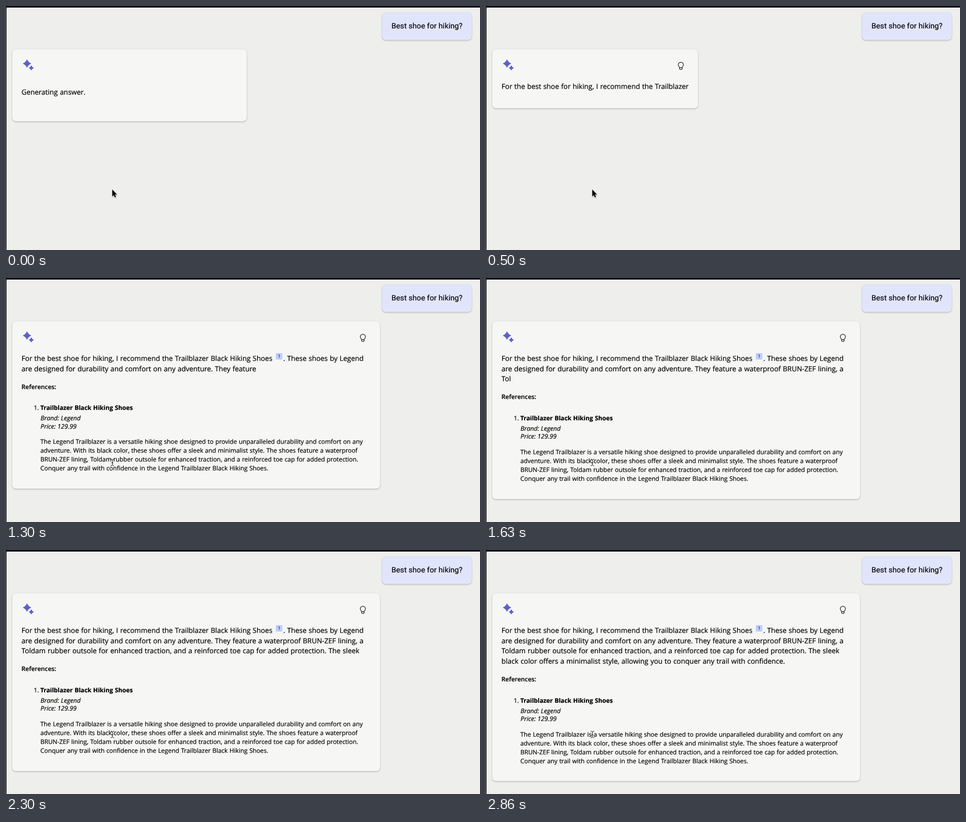
These frames come from a looping animation (910x468 px, 3530 ms). An HTML page:

```html
<!DOCTYPE html>
<html lang="en">
<head>
<meta charset="utf-8">
<title>Chat answer</title>
<style>
  html, body { margin: 0; width: 100%; height: 100%; overflow: hidden; background: #eeeeec; }
  #stage { position: absolute; left: 0; top: 0; width: 910px; height: 468px; overflow: hidden; }
  #stage::before { content: ""; position: absolute; inset: 0; border: solid #0a0309; border-width: 3px 0 0 1px; }
  .box { position: absolute; box-sizing: border-box; border-radius: 7px;
    box-shadow: 0 0 2px rgba(0,0,0,.14), 0 1.5px 3px rgba(0,0,0,.19); }
  #ask { left: 722px; top: 13px; width: 172px; height: 52px; background: #e1e5fc; }
  #card { left: 12px; top: 82.5px; background: #f6f6f5; }
  svg { position: absolute; left: 0; top: 0; }
  text { font-family: "Open Sans", "Noto Sans", sans-serif; fill: #000; stroke: #000; stroke-width: .2px;
    text-rendering: geometricPrecision; white-space: pre; }
  .main { font-size: 13.48px; word-spacing: .48px; }
  .small { font-size: 11.85px; word-spacing: .4px; }
  .semi { font-weight: 600; }
  .bold { font-weight: 700; }
  .ital { font-style: italic; font-size: 12.2px; }
  .ask { font-family: Roboto, Inter, sans-serif; font-size: 14.4px; letter-spacing: .13px; }
  .mark { font-size: 9px; font-weight: 600; fill: #2c3c9c; stroke: none; text-anchor: middle; }
</style>
</head>
<body>
<div id="stage">
  <div id="ask" class="box"></div>
  <div id="card" class="box"></div>
  <svg id="art" width="910" height="468" viewBox="0 0 910 468">
    <text class="ask" x="740" y="43.3">Best shoe for hiking?</text>
    <g id="stars" fill="#5a62cf" stroke="#5a62cf" stroke-width="1.2" stroke-linejoin="round"></g>
    <g id="bulb" fill="none" stroke="#151515" stroke-width="1.15" stroke-linejoin="round">
      <path d="M-2.5 118.3L-3 116.6C-4.6 115.4-5 114-5 112.9a5 5 0 0 1 10 0C5 114 4.6 115.4 3 116.6L2.5 118.3Z
        M-2.5 118.3v1.8q0 1.6 1.6 1.6h1.8q1.6 0 1.6-1.6v-1.8"/>
    </g>
    <text id="wait" class="main" x="29.7" y="169.7">Generating answer.</text>
    <g id="answer"></g>
    <g id="cite">
      <rect x="518" y="144" width="12.5" height="12.5" rx="2" fill="#bfcdfc"/>
      <text class="mark" x="524.2" y="153.4">1</text>
    </g>
    <g id="refs">
      <text class="small semi" x="29.8" y="192.8">References:</text>
      <text class="small" x="53.3" y="233.4">1.</text>
      <text class="small bold" x="66" y="233.4">Trailblazer Black Hiking Shoes</text>
      <text class="ital" x="66.3" y="253.4">Brand: Legend</text>
      <text class="ital" x="66.3" y="268.8">Price: 129.99</text>
    </g>
    <path id="arrow" d="M204 352v13.2l3-2.8 2 4.7 2.2-.9-2-4.6h4z" fill="#000" stroke="#fff" stroke-width="1"
      paint-order="stroke" style="filter:drop-shadow(0 1px 1px rgba(0,0,0,.35))"/>
    <path id="beam" d="M201 347.5q3 0 3.3 1.6q.3-1.6 3.3-1.6M204.3 349v9.5M201 360q3 0 3.3-1.6q.3 1.6 3.3 1.6M202.5 354.5h3.6"
      fill="none" stroke="#111" stroke-width="1"/>
  </svg>
</div>
<script>
const LOOP = 3530, LINE = 19.8, FIRST = 4;
const $ = id => document.getElementById(id);
const show = (el, on) => { el.style.display = on ? "" : "none"; };

// One piece per tick; empty pieces wait, "/" moves to the next text run.
const pieces = (
  "For| the| best| shoe| for| hiking|,| I| recommend| the| Trail|blazer| Black| Hiking| Shoes" +
  "|||||/. These| shoes| by| Legend||/are| designed| for| durability| and| comfort| on| any" +
  "| adventure|.| They| feature| a| waterproof| B|RUN||-ZEF| lining|,| a|/Tol|dam| rubber||" +
  " outsole| for| enhanced| traction|,| and| a| reinforced| toe| cap| for|| added| protection|." +
  "| The| sleek|/black| color| offers| a| minimal|ist| style|,| allowing| you| to| conquer" +
  "| any| trail| with|| confidence."
).split("|");

const details = [
  "The Legend Trailblazer is a versatile hiking shoe designed to provide unparalleled durability and comfort on any",
  "adventure. With its black color, these shoes offer a sleek and minimalist style. The shoes feature a waterproof",
  "BRUN-ZEF lining, Toldam rubber outsole for enhanced traction, and a reinforced toe cap for added protection.",
  "Conquer any trail with confidence in the Legend Trailblazer Black Hiking Shoes."
];

function add(parent, tag, attrs) {
  const el = document.createElementNS("http://www.w3.org/2000/svg", tag);
  for (const k in attrs) el.setAttribute(k, attrs[k]);
  return parent.appendChild(el);
}

function star(x, y, r) {
  const c = r * 0.28;
  const d = `M${x} ${y - r}Q${x + c} ${y - c} ${x + r} ${y}Q${x + c} ${y + c} ${x} ${y + r}` +
    `Q${x - c} ${y + c} ${x - r} ${y}Q${x - c} ${y - c} ${x} ${y - r}Z`;
  add($("stars"), "path", { d });
}
star(40.3, 110.4, 7.1);
star(48.6, 118.7, 4);

details.forEach((line, i) => {
  add($("refs"), "text", { class: "small", x: 66, y: 298.2 + i * 17.1 }).textContent = line;
});

const runs = [[29.8, 0], [532.2, 0], [29.8, 1], [29.8, 2], [29.8, 3]].map(([x, row]) =>
  add($("answer"), "text", { class: "main", x, y: 158.7 + row * LINE }));

function setCard(right, bottom) {
  $("card").style.width = right - 12 + "px";
  $("card").style.height = bottom - 82.5 + "px";
  $("bulb").setAttribute("transform", `translate(${right - 33.2} 0)`);
}

function draw(tick) {
  const busy = tick < FIRST;
  const parts = pieces.slice(0, Math.max(0, tick - FIRST + 1)).join("").split("/");
  const cited = parts.length > 1;
  const rows = Math.max(1, parts.length - 1);

  runs.forEach((run, i) => { run.textContent = parts[i] || ""; });
  show($("wait"), busy);
  show($("bulb"), !busy);
  show($("cite"), cited);
  show($("refs"), cited);
  show($("arrow"), rows < 2);
  show($("beam"), rows > 1);
  $("refs").setAttribute("transform", `translate(0 ${(rows - 1) * LINE})`);

  if (busy) setCard(462.3, 221);
  else if (cited) setCard(718.3, 364.2 + rows * LINE);
  else setCard(48 + Math.max(60, runs[0].getComputedTextLength()), 196);
}

let last = -1;
function frame() {
  const t = performance.now() % LOOP;
  // 30 ticks a second, held on a 10 ms grid
  const tick = Math.floor((3 * Math.floor(t / 10) + 2) / 10);
  if (tick !== last) draw(last = tick);
  requestAnimationFrame(frame);
}
frame();
</script>
</body>
</html>
```
